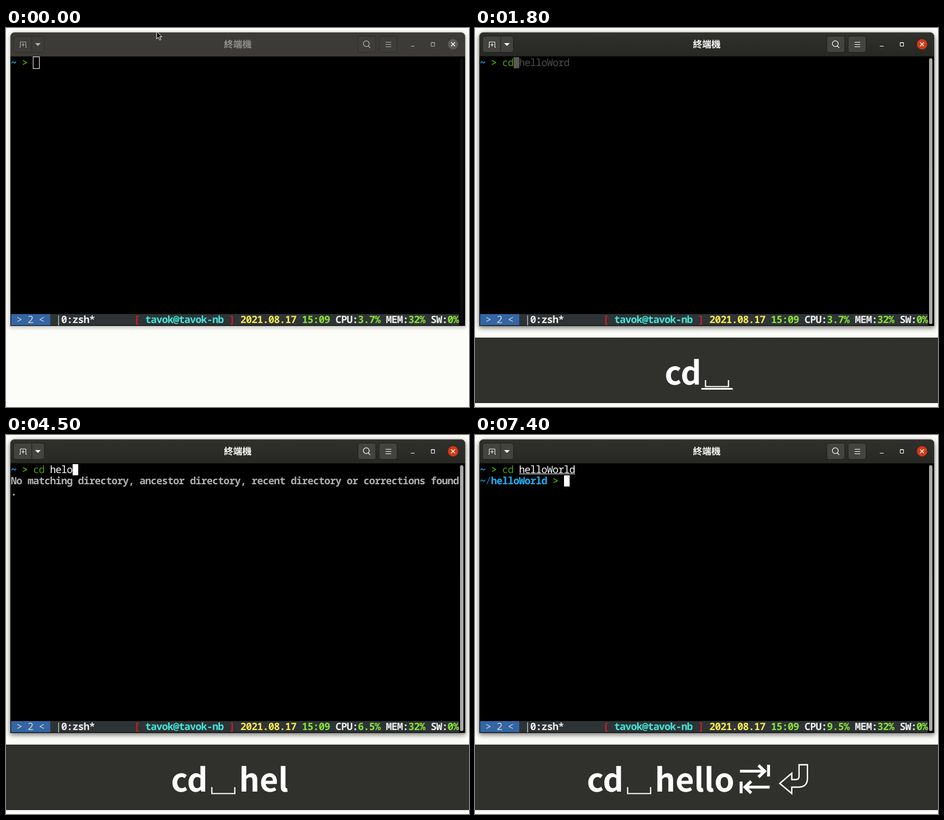
Recreate the animation shown at these times as an HTML page. Size 827 by 677 pixels, loop 8000 ms.

```html
<!DOCTYPE html>
<html lang="zh-Hant">
<head>
<meta charset="utf-8">
<style>
html, body { margin: 0; width: 100%; height: 100%; overflow: hidden; background: #fcfdf8; }
div { position: absolute; left: 8px; top: 8px; width: 812px; height: 524px; border-radius: 8px 8px 0 0; }
#dim { box-shadow: 0 2px 6px 2px rgba(0,0,0,.2), 0 0 0 1px rgba(0,0,0,.18); }
#glow { box-shadow: 0 3px 9px 1px rgba(0,0,0,.5), 0 0 0 1px rgba(0,0,0,.23); }
svg { position: absolute; left: 0; top: 0; }
text { white-space: pre; text-rendering: geometricPrecision; }
.mono { font: 18px "Noto Sans Mono", "DejaVu Sans Mono", monospace; letter-spacing: -.8px; }
.bold { font-weight: 700; }
.title, .keys { font: 700 16.5px "Noto Sans CJK TC", "Noto Sans CJK SC", "Noto Sans CJK JP", sans-serif; }
.keys { font-size: 57.4px; fill: #fff; }
</style>
</head>
<body>
<div id="dim"></div><div id="glow"></div>
<svg width="827" height="677" viewBox="0 0 827 677">
  <defs>
    <linearGradient id="bar" x2="0" y2="1"><stop stop-color="#30302c"/><stop offset="1" stop-color="#272724"/></linearGradient>
  </defs>
  <rect x="8" y="51" width="812" height="481"/>
  <g id="idle"></g>
  <g id="active"></g>
  <g id="term" class="mono"></g>
  <g id="panel" class="keys"></g>
  <path id="pointer" d="M269 6v13.5l3-2.8 2.6 5 2.2-1-2.5-5h4.3z" fill="#111" stroke="#fff"/>
</svg>
<script>
const $ = id => document.getElementById(id);
const LOOP = 8000, CENTER = 399.5;

// time, keys shown in the panel, how many of them are underlined, command line
const steps = [
  [0, "", 0, ""],
  [1200, "c", 1, ""],
  [1300, "c", 1, "c"],
  [1400, "cd", 1, "c"],
  [1500, "cd", 1, "cd"],
  [1800, "cd ", 1, "cd"],
  [1900, "cd h", 1, "cd "],
  [2000, "cd he", 1, "cd h"],
  [2100, "cd he", 1, "cd he"],
  [2300, "cd he", 0, "cd he"],
  [2400, "cd hel", 1, "cd he"],
  [2500, "cd helo", 1, "cd helo"],
  [2700, "cd heloo", 1, "cd helo"],
  [2900, "cd heloo", 0, "cd heloo"],
  [3400, "cd helo", 0, "cd heloo"],
  [3600, "cd hel", 0, "cd helo"],
  [3800, "cd hel", 0, "cd hel"],
  [4000, "cd helo", 1, "cd hel"],
  [4200, "cd helo", 0, "cd helo"],
  [4500, "cd hel", 0, "cd helo"],
  [4700, "cd hel", 0, "cd hel"],
  [4900, "cd helo", 1, "cd hel"],
  [5100, "cd helo", 0, "cd helo"],
  [5400, "cd hel", 0, "cd helo"],
  [5500, "cd hel", 0, "cd hel"],
  [5600, "cd hell", 1, "cd hel"],
  [5700, "cd hello", 1, "cd hell"],
  [5900, "cd hello", 0, "cd hello"],
  [6000, "cd hello\t", 1, "cd hello"],
  [6200, "cd hello\t", 0, "cd helloWorld/"],
  [6800, "cd hello\t\n", 1, "cd helloWorld/"],
  [6900, "cd hello\t\n", 1, "cd helloWorld\n"],
  [7400, "cd hello\t\n", 0, "cd helloWorld\n"]
];

const esc = s => s.replace(/</g, "&lt;").replace(/>/g, "&gt;");
const rect = (x, y, w, h, fill, more = "") =>
  `<rect x="${x}" y="${y}" width="${w}" height="${h}" fill="${fill}" ${more}/>`;
const line = (d, color, width = 1) => `<path d="${d}" fill="none" stroke="${color}" stroke-width="${width}"/>`;

// terminal grid: 10 px columns, 20 px rows, status line last
const colX = c => 9 + 10 * c;
const rowY = r => r === "status" ? 511 : 52 + 20 * r;
const put = (c, r, s, fill, bold) =>
  `<text x="${colX(c) - .4}" y="${rowY(r) + 16}" fill="${fill}"${bold ? ' class="bold"' : ""}>${esc(s)}</text>`;
const block = (c, r, fill = "#fff") => rect(colX(c), rowY(r), 10, 20, fill);

function header(on) {
  const ink = on ? "#fff" : "#b4b4b0", edge = on ? "#1d1d1b" : "#2b2b28";
  const button = (x, w) => rect(x + .5, 14.5, w, 29, on ? "#43433f" : "#3e3d39", `rx="4" stroke="${edge}"`);
  return `<path d="M8 51V16q0-8 8-8h796q8 0 8 8v35z" fill="${on ? "url(#bar)" : "#3c3b37"}"/>` +
    line("M14 8.5h800", on ? "#40403c" : "#464541") +
    line("M8 50.5h812", on ? "#191917" : "#2e2d2a") +
    button(13, 55) + button(628, 32) + button(666, 32) +
    line("M46 15v29", edge) +
    line("M24 34.5h1.5v-9.5h10v9.5h1.5M30.5 27v6M27.5 30h6", ink) +
    `<path d="M52 27h10l-5 5z" fill="${ink}"/>` +
    `<circle cx="643.5" cy="28" r="5.2" fill="none" stroke="${ink}" stroke-width="1.2"/>` +
    line("M647 32l3.5 3.5", ink, 1.3) +
    line("M678 25.5h10M678 29.5h10M678 33.5h10", ink) +
    line("M723 32.5h7", ink) +
    line("M759.5 26h6v6.5h-6zM759 26.5h7", ink) +
    `<circle cx="798.5" cy="29" r="9.2" fill="${on ? "#d23a14" : "#5b5a56"}"/>` +
    line("M795 25.5l7 7M802 25.5l-7 7", "#fff", 1.4) +
    `<text class="title" x="414" y="35" text-anchor="middle" fill="${on ? "#fff" : "#92918d"}">終端機</text>` +
    rect(811, 54, 6, 475, on ? "#a9a9a7" : "#0d0d0d", 'rx="3"');
}

function status(cpu) {
  const r = "status", white = "#eeeeec", green = "#8ae234", red = "#cc1f1f";
  const parts = [
    [8, "|", "#d3d7cf"], [9, "0:zsh*", white, 1],
    [22, "[", red, 1], [24, "tavok@tavok-nb", "#43e6dc", 1], [39, "]", red, 1],
    [41, "2021.08.17", "#fce94f", 1], [52, "15:09", green, 1],
    [58, "CPU:", white, 1], [62, cpu, green, 1],
    [67, "MEM:", white, 1], [71, "32%", green, 1],
    [75, "SW:", white, 1], [78, "0%", green, 1]
  ];
  return rect(9, 511, 800, 20, "#2e3436") + rect(9, 511, 70, 20, "#3465a4") + put(1, r, "> 2 <", "#d3d7cf") +
    parts.map(([c, s, fill, bold]) => put(c, r, s, fill, bold)).join("");
}

function terminal(input, focused) {
  const blue = "#1fb0f5", lime = "#5fd700", grey = "#b0b0ae";
  const done = input.endsWith("\n"), cmd = input.trimEnd();
  const word = cmd.slice(3), end = 4 + input.length;
  const known = "helloWorld/".startsWith(word), prefix = "helloWorld".startsWith(word);
  let out = put(0, 0, "~", blue, 1) + put(2, 0, ">", lime) +
    put(4, 0, cmd.slice(0, 2), "#4e9a06") + put(7, 0, word, "#fff");
  if (word && known) out += rect(colX(7), 69, 10 * word.length, 1, "#fff");
  if (done)
    return out + put(0, 1, "~", blue, 1) + put(1, 1, "/", "#1480b4") + put(2, 1, "helloWorld", blue, 1) +
      put(13, 1, ">", lime) + block(15, 1);
  if (!focused) return out + rect(48.5, 51.5, 11, 21, "none", 'stroke="#fff"');
  const past = "cd helloWord";
  if (input && past.startsWith(input)) {
    const rest = past.slice(input.length);
    out += block(end, 0, "#585858") + put(end, 0, rest[0], "#2c2c2c") + put(end + 1, 0, rest.slice(1), "#4e4e4e");
  } else out += block(end, 0);
  if (word && prefix) out += put(0, 1, "directory", grey, 1) + put(0, 2, "helloWorld/", "#fff");
  else if (word)
    out += put(0, 1, "No matching directory, ancestor directory, recent directory or corrections found", grey, 1) +
      put(0, 2, ".", grey, 1);
  return out;
}

// key panel: letters are text, space, tab and enter are drawn signs
const pen = document.createElement("canvas").getContext("2d");
const signs = {
  " ": { w: 56, draw: x => line(`M${x + 7.5} 629v11.5h41v-11.5`, "#fff", 2.2) },
  "\t": { w: 66, draw: x =>
    line(`M${x + 10} 600.5h46M${x + 43} 590l11 10.5l-11 10.5M${x + 61} 589v21`, "#fff", 5.2) +
    line(`M${x + 63} 629h-46M${x + 30} 618.5l-11 10.5l11 10.5M${x + 12} 619v21`, "#fff", 5.2) },
  "\n": { w: 70, draw: x =>
    line(`M${x + 15} 622.5l21.5-18.5v11.5h7q6 0 6-6v-20.5h15v24q0 16-16 16h-12v11.5z`, "#fff", 2.4) }
};
const runs = s => s.match(/[a-z]+|\s/g) || [];
const runWidth = s => signs[s] ? signs[s].w : pen.measureText(s).width;
const width = s => runs(s).reduce((sum, r) => sum + runWidth(r), 0);

function panel(keys, recent) {
  if (!keys) return "";
  pen.font = getComputedStyle($("panel")).font;
  const left = CENTER - width(keys) / 2;
  let out = rect(0, 553, 827, 117, "#30312d"), x = left;
  for (const r of runs(keys)) {
    out += signs[r] ? signs[r].draw(x) : `<text x="${x}" y="637">${r}</text>`;
    x += runWidth(r);
  }
  if (recent) {
    const inset = { "\t": 8, "\n": 13 }[keys.at(-1)] || 0;
    const from = left + width(keys.slice(0, -recent)) + inset;
    out += rect(from, 643, x - from, 3, "#fff");
  }
  return out;
}

$("idle").innerHTML = header(false);
$("active").innerHTML = header(true);

function draw(t) {
  const [, keys, recent, input] = steps.findLast(s => s[0] <= t);
  const focus = 1 - (1 - Math.min(1, t / 500)) ** 2;
  $("active").style.opacity = $("glow").style.opacity = focus;
  $("dim").style.opacity = 1 - focus;
  $("pointer").style.display = t < 300 ? "" : "none";
  $("term").innerHTML = terminal(input, t > 0) + status(t < 2000 ? "3.7%" : t < 6900 ? "6.5%" : "9.5%");
  $("panel").innerHTML = panel(keys, recent);
}

const start = performance.now();
let last = -1;
function loop() {
  const t = Math.floor((performance.now() - start) % LOOP / 100) * 100;
  if (t !== last) draw(last = t);
  requestAnimationFrame(loop);
}
loop();
</script>
</body>
</html>
```
